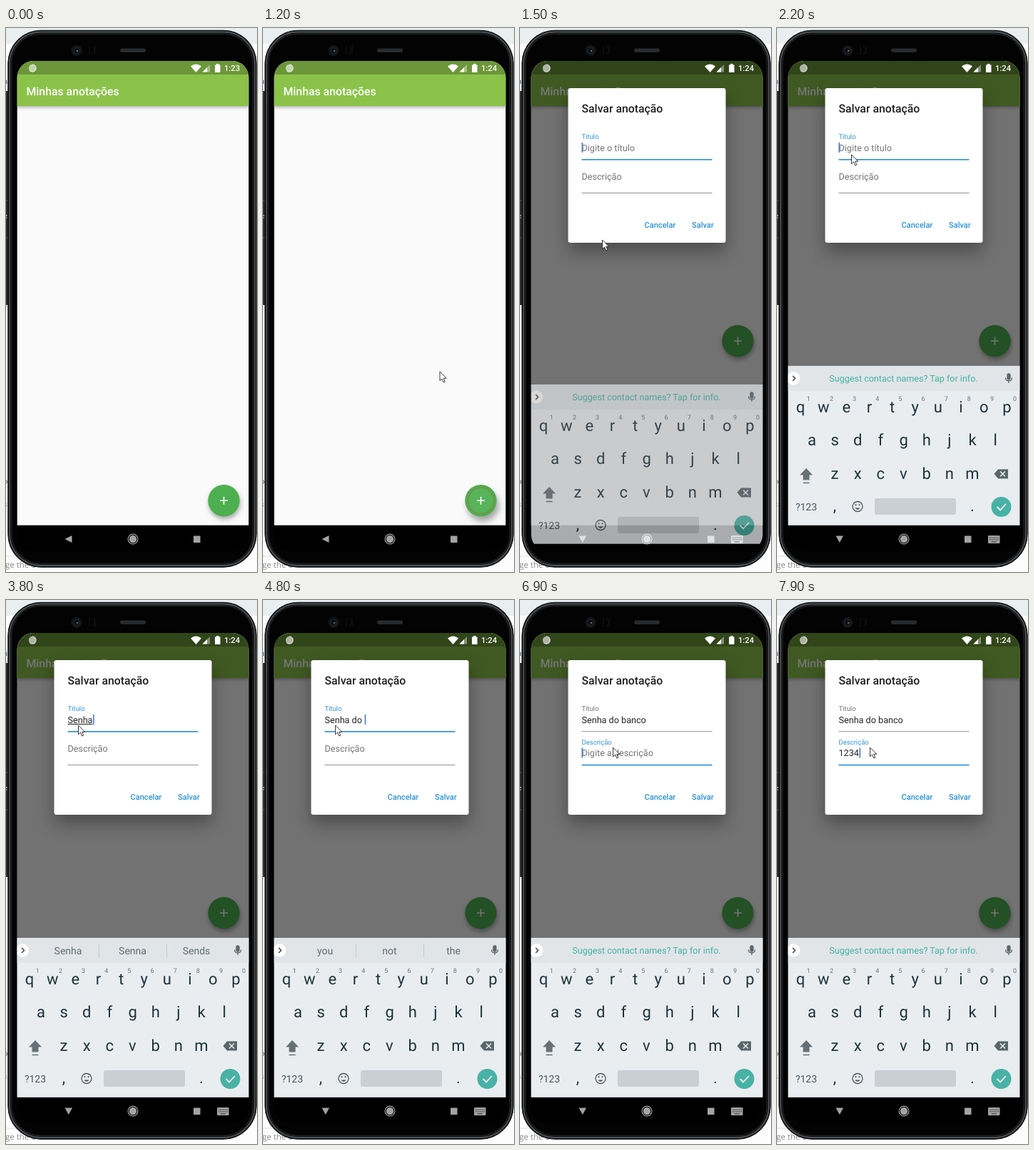
Write an HTML page that moves like this. It is 352x760 px and loops after 8 s.

```html
<!DOCTYPE html>
<html lang="pt">
<head>
<meta charset="utf-8">
<title>Minhas anotações</title>
<style>
  html, body { margin: 0; width: 100%; height: 100%; overflow: hidden; background: #fff; }
  svg { display: block; width: 352px; height: 760px; font-family: Roboto, sans-serif; }
  text { white-space: pre; text-rendering: geometricPrecision; }
  .mid { text-anchor: middle; }
  .medium { font-weight: 500; }
  .field { font-size: 12.64px; }
  .key { font-size: 22px; fill: #1c343c; }
  .word { font-size: 14px; fill: #626b70; }
  #panel { filter: drop-shadow(0 12px 12px rgba(0,0,0,.34)); }
  #fab { filter: drop-shadow(1px 4px 3px rgba(0,0,0,.32)); }
  #fab.pressed { filter: drop-shadow(3px 7px 4px rgba(0,0,0,.34)); }
  #bar { filter: drop-shadow(0 2px 2px rgba(0,0,0,.3)); }
</style>
</head>
<body>
<svg viewBox="0 0 352 760" xmlns="http://www.w3.org/2000/svg">
  <defs>
    <clipPath id="screen"><rect x="15.700" y="46" width="324.600" height="685" rx="23"/></clipPath>
  </defs>

  <!-- desktop behind the phone -->
  <rect width="352" height="760" fill="#fdfdfd"/>
  <rect width="352" height="22" fill="#e9eef1"/>
  <rect y="88" width="8" height="299" fill="#2b2c2e"/>
  <path d="M0 241H8M0 293H8" stroke="#55575a"/>
  <path d="M0 738H60" stroke="#ddd"/>
  <text x="-4" y="78" font-size="11" fill="#3d4a8c">a</text>
  <text x="-3" y="272" font-size="14" fill="#ddd">f</text>
  <text x="-4" y="637" font-size="11" fill="#555">o</text>
  <text x="-4" y="669" font-size="11" fill="#999">s</text>
  <text x="-1" y="754" font-size="11.5" fill="#8b8b8b" style="font-family:'Open Sans',sans-serif">ge the c</text>

  <!-- phone body -->
  <rect x="2.800" y="3.300" width="348.400" height="750" rx="46" fill="#08090a" stroke="#17191b"/>
  <rect x="5" y="5.500" width="344" height="745.500" rx="44" fill="#000" stroke="#505457" stroke-width="1.800"/>
  <rect x="7.500" y="8" width="339" height="740.500" rx="41" fill="#030303" stroke="#1d1f20" stroke-width="2"/>
  <circle cx="99" cy="31.500" r="7.500" fill="#131619"/>
  <circle cx="99" cy="31.500" r="4" fill="#08090b" stroke="#262b30"/>
  <circle cx="100" cy="32" r="1.300" fill="#646b72"/>
  <path d="M117 25V37M121 25L125 31L121 37M125 25V37" fill="none" stroke="#121416"/>
  <rect x="160" y="28.500" width="36" height="5.500" rx="2.700" fill="#292a2b"/>

  <g clip-path="url(#screen)">
    <rect x="15" y="46" width="326" height="649" fill="#fafafa"/>
    <g id="bar"><rect x="15" y="46" width="326" height="63" fill="#8bc34a"/></g>
    <rect x="15" y="46" width="326" height="19" fill="#6c9639"/>
    <text class="medium" x="28.500" y="93.500" font-size="15.8" fill="#fff">Minhas anotações</text>
    <g id="fab">
      <circle r="22.200" fill="#4caf50"/>
      <g id="ripple"><circle fill="#fff" fill-opacity=".06" stroke="#94803c" stroke-opacity=".75" stroke-width="1.600"/></g>
      <path d="M-5.500 0H5.500M0-5.500V5.500" stroke="#fff" stroke-width="1.600"/>
    </g>
    <rect id="dim" x="15" y="46" width="326" height="649" fill="#000"/>

    <!-- status icons -->
    <circle cx="37" cy="56" r="5.200" fill="#fff" fill-opacity=".6"/>
    <path d="M37 50.800A5.200 5.200 0 1 1 33 59.300" fill="none" stroke="#fff" stroke-opacity=".65" stroke-width="1.200"/>
    <g fill="#fff">
      <path d="M259 53.500Q266.500 47.500 274 53.500L266.500 62Z"/>
      <path d="M275.500 61.500L286 51V61.500Z" fill-opacity=".4"/>
      <path d="M275.500 61.500L282 55V61.500Z"/>
      <path d="M293 51.500H295V50H298.500V51.500H300.500V62H293Z"/>
      <text class="medium" id="clock" x="306" y="60" font-size="11.2"></text>
    </g>

    <g id="dialog">
      <rect id="panel" x="67.500" y="84" width="221" height="216" rx="3.200" fill="#fff"/>
      <text class="medium" x="86.500" y="118" font-size="15.8" fill="#1f1f1f">Salvar anotação</text>
      <text id="titleLabel" x="86.500" y="155.300" font-size="9.500">Título</text>
      <text class="field" id="titleText" x="86.500" y="171.500"></text>
      <rect id="titleLine" x="86.500" width="183"/>
      <text id="descLabel" x="86.500">Descrição</text>
      <text class="field" id="descText" x="86.500" y="218"></text>
      <rect id="descLine" x="86.500" width="183"/>
      <rect id="compose" y="173" height="1" fill="#222"/>
      <rect id="caret" width="1.600" height="14" fill="#3f7fe0"/>
      <g class="medium" font-size="11.06" fill="#2a92d4">
        <text x="174.500" y="279">Cancelar</text>
        <text x="241" y="279">Salvar</text>
      </g>
    </g>

    <rect x="15" y="694.700" width="326" height="40" fill="#000"/>

    <g id="keyboard">
      <rect x="15" y="472" width="326" height="222.700" fill="#eaedf0"/>
      <rect x="15" y="472" width="326" height="35" fill="#e1e5e8"/>
      <circle cx="23" cy="489.500" r="9.300" fill="#fff"/>
      <path d="M22 486L25.500 489.500L22 493" fill="none" stroke="#444" stroke-width="1.500"/>
      <g fill="none" stroke="#5d666b" stroke-width="1.300">
        <rect x="323" y="483" width="4" height="8" rx="2" fill="#5d666b"/>
        <path d="M320.500 488.500Q320.500 493 325 493T329.500 488.500M325 493V496"/>
      </g>
      <text class="mid" id="tip" x="177.500" y="494.300" font-size="12.55" fill="#43b3a4">Suggest contact names? Tap for info.</text>
      <g id="words">
        <path d="M130.500 480V499M225.500 480V499" stroke="#c5cacd"/>
        <text class="mid word" x="87" y="494.800"></text>
        <text class="mid word" x="177.500" y="494.800"></text>
        <text class="mid word" x="267" y="494.800"></text>
      </g>
      <g id="keys"></g>
      <path d="M41 615L50 624.500H45.500V631.500H36.500V624.500H32Z" fill="#667177"/>
      <path d="M36.500 635.500H45.500" stroke="#667177" stroke-width="1.600"/>
      <path d="M304.500 623L310 616.500H324V629.500H310Z" fill="#59666c"/>
      <path d="M313 619.500L320 626.500M320 619.500L313 626.500" stroke="#eaeef1" stroke-width="1.500"/>
      <text class="mid" x="41" y="673.500" font-size="14" fill="#47555b">?123</text>
      <text class="mid key" x="81" y="675">,</text>
      <text class="mid key" x="274" y="675">.</text>
      <g fill="none" stroke="#47555b" stroke-width="1.300">
        <circle cx="113" cy="668.500" r="7"/>
        <path d="M109.500 670.500Q113 675 116.500 670.500Z" fill="#47555b" stroke="none"/>
        <path d="M110.500 665.300V667.300M115.500 665.300V667.300" stroke-width="1.800"/>
      </g>
      <rect x="137" y="657" width="114" height="23" rx="3" fill="#cacfd3"/>
      <circle cx="314.500" cy="669" r="14" fill="#48b2a6"/>
      <path d="M308.500 669L313 673.500L321 665" fill="none" stroke="#fff" stroke-width="1.800"/>
    </g>

    <!-- navigation buttons -->
    <g fill="#fff" opacity=".64">
      <path id="back"/>
      <circle cx="178" cy="714" r="5.200"/>
      <circle cx="178" cy="714" r="6.900" fill="none" stroke="#fff" stroke-width="1.200"/>
      <rect x="263" y="709.500" width="9.500" height="9.500"/>
      <g id="imeIcon" stroke="#777">
        <rect x="296" y="709" width="16.500" height="11" rx="1.300" stroke="none"/>
        <path d="M298 712H311M298 714.800H311" stroke-width="1.400" stroke-dasharray="1.600 1.200"/>
        <path d="M300.500 717.800H308" stroke-width="1.300"/>
      </g>
    </g>
  </g>

  <path id="mouse" d="M0 0V12.800L3 10L5.200 15L7.300 14L5.200 9.300H9.200Z" fill="#fff" stroke="#222" stroke-width=".9"/>
</svg>

<script>
const LOOP = 8000, STEP = 100, BLINK = 520;
const BLUE = '#3395d6', GREY = '#747474', INK = '#242424';
const $ = id => document.getElementById(id);
const set = (el, attrs) => { for (const k in attrs) el.setAttribute(k, attrs[k]); };
const show = (el, on) => { el.style.display = on ? '' : 'none'; };
const clamp = v => Math.min(1, Math.max(0, v));

// time, x, y of the pointer
const path = [
  [0, -14, 440], [100, -10, 440], [400, 130, 560], [800, 302, 659], [1000, 302, 659],
  [1200, 248, 480], [1500, 115.5, 296], [1800, 113, 190], [2200, 104.5, 177],
  [2400, 101.5, 175], [5700, 101.5, 175], [6100, 149, 237], [6600, 130.5, 206]
];

// time, text, suggestions
const title = [
  [0, ''],
  [3000, 'S', 'S So She'], [3200, 'Se', 'Se See Send'], [3400, 'Sen', 'Sen Send Sent'],
  [3500, 'Senh', 'Senh Send Sent'], [3700, 'Senha', 'Senha Senna Sends'],
  [3900, 'Senha ', 'is and the'], [4200, 'Senha d', 'd do did'],
  [4400, 'Senha do', 'do so doing'], [4700, 'Senha do ', 'you not the'],
  [4900, 'Senha do b', 'b be by'], [5100, 'Senha do ba', 'ba bad back'],
  [5200, 'Senha do ban', 'ban band bank'], [5400, 'Senha do banc', 'banc band bank'],
  [5600, 'Senha do banco', 'banco Vancouver Blanco']
];
const desc = [[6700, ''], [7100, '1'], [7300, '12'], [7600, '123'], [7900, '1234']];

const keys = [];
[['qwertyuiop', 33, 536.7], ['asdfghjkl', 49, 583.3], ['zxcvbnm', 81, 630]].forEach(([row, x, y], r) => {
  [...row].forEach((ch, i) => {
    const cx = x + i * 32.15;
    const key = addText(ch, cx, y, 'mid key');
    keys.push([key, ch]);
    if (!r) set(addText((i + 1) % 10, cx + 11.3, 521, 'mid'), { 'font-size': 9, fill: '#66757b' });
  });
});

function addText(str, x, y, cls) {
  const el = document.createElementNS('http://www.w3.org/2000/svg', 'text');
  set(el, { x, y, class: cls });
  el.textContent = str;
  $('keys').append(el);
  return el;
}

const pen = document.createElement('canvas').getContext('2d');
const width = str => {
  pen.font = '12.64px Roboto, sans-serif';
  return pen.measureText(str).width;
};
const latest = (rows, t) => rows.reduce((a, b) => b[0] <= t ? b : a);

function pointer(t) {
  const i = path.findIndex(p => p[0] > t);
  if (i < 0) return path[path.length - 1].slice(1);
  const [a, b] = [path[i - 1], path[i]], k = (t - a[0]) / (b[0] - a[0]);
  return [a[1] + (b[1] - a[1]) * k, a[2] + (b[2] - a[2]) * k];
}

function field(el, str, hint, focused) {
  el.textContent = str || (focused ? hint : '');
  el.setAttribute('fill', str ? INK : GREY);
}

function underline(el, y, focused) {
  set(el, { y: focused ? y - .3 : y, height: focused ? 1.7 : .9, fill: focused ? BLUE : '#858585' });
}

function drawDialog(t) {
  const fade = clamp((t - 1200) / 200);
  set($('dim'), { opacity: fade * .54 });
  set($('dialog'), { opacity: fade, transform: `translate(0 ${188 * clamp((1500 - t) / 200)})` });

  const onDesc = t >= 6700;
  const [tTime, tText, hints] = latest(title, t);
  const [dTime, dText] = latest(desc, t);
  field($('titleText'), tText, 'Digite o título', !onDesc);
  field($('descText'), dText, 'Digite a descrição', onDesc);
  underline($('titleLine'), 183.3, !onDesc);
  underline($('descLine'), 230, onDesc);

  const lift = clamp((t - 6600) / 200);
  set($('titleLabel'), { fill: onDesc ? GREY : BLUE });
  set($('descLabel'), { fill: onDesc ? BLUE : GREY, y: 211.7 - 9.7 * lift, 'font-size': 12.64 - 3.14 * lift });

  const text = onDesc ? dText : tText;
  const base = onDesc ? dTime : tTime || BLINK * 2;
  show($('caret'), Math.floor((t - base) / BLINK) % 2 === 0);
  set($('caret'), { x: 86.5 + width(text) + (text ? .6 : 0), y: onDesc ? 206.5 : 160 });

  const start = tText.lastIndexOf(' ') + 1;
  set($('compose'), {
    x: 86.5 + width(tText.slice(0, start)),
    width: onDesc ? 0 : width(tText.slice(start))
  });

  const words = !onDesc && hints;
  show($('tip'), !words);
  show($('words'), words);
  if (words) {
    const slots = $('words').querySelectorAll('text');
    words.split(' ').forEach((w, i) => { slots[i].textContent = w; });
  }
}

function drawKeyboard(t) {
  const open = t >= 1400;
  show($('keyboard'), t >= 1500);
  const slide = clamp((1700 - t) / 200);
  set($('keyboard'), { opacity: 1 - .28 * slide, transform: `translate(0 ${26 * slide * slide})` });
  const upper = t === 2900;
  for (const [el, ch] of keys) el.textContent = upper ? ch.toUpperCase() : ch;
  set($('back'), { d: open ? 'M82.500 709.500H93L87.800 719Z' : 'M92.500 709V719L82.500 714Z' });
  show($('imeIcon'), open);
  set($('fab'), { transform: `translate(305.5 ${open ? 437.3 : 660.3})` });
}

function draw(time) {
  const t = Math.floor(time % LOOP / STEP) * STEP;
  const pressed = t >= 1000 && t < 1400;
  $('clock').textContent = t < 500 ? '1:23' : '1:24';
  $('fab').classList.toggle('pressed', pressed);
  show($('ripple'), pressed);
  set($('ripple').firstChild, { r: 6 + 12 * clamp((t - 900) / 300) });
  drawDialog(t);
  drawKeyboard(t);
  set($('mouse'), { transform: `translate(${pointer(t).join(' ')})` });
}

const begin = performance.now();
function tick() {
  draw(performance.now() - begin);
  requestAnimationFrame(tick);
}
tick();
</script>
</body>
</html>
```
